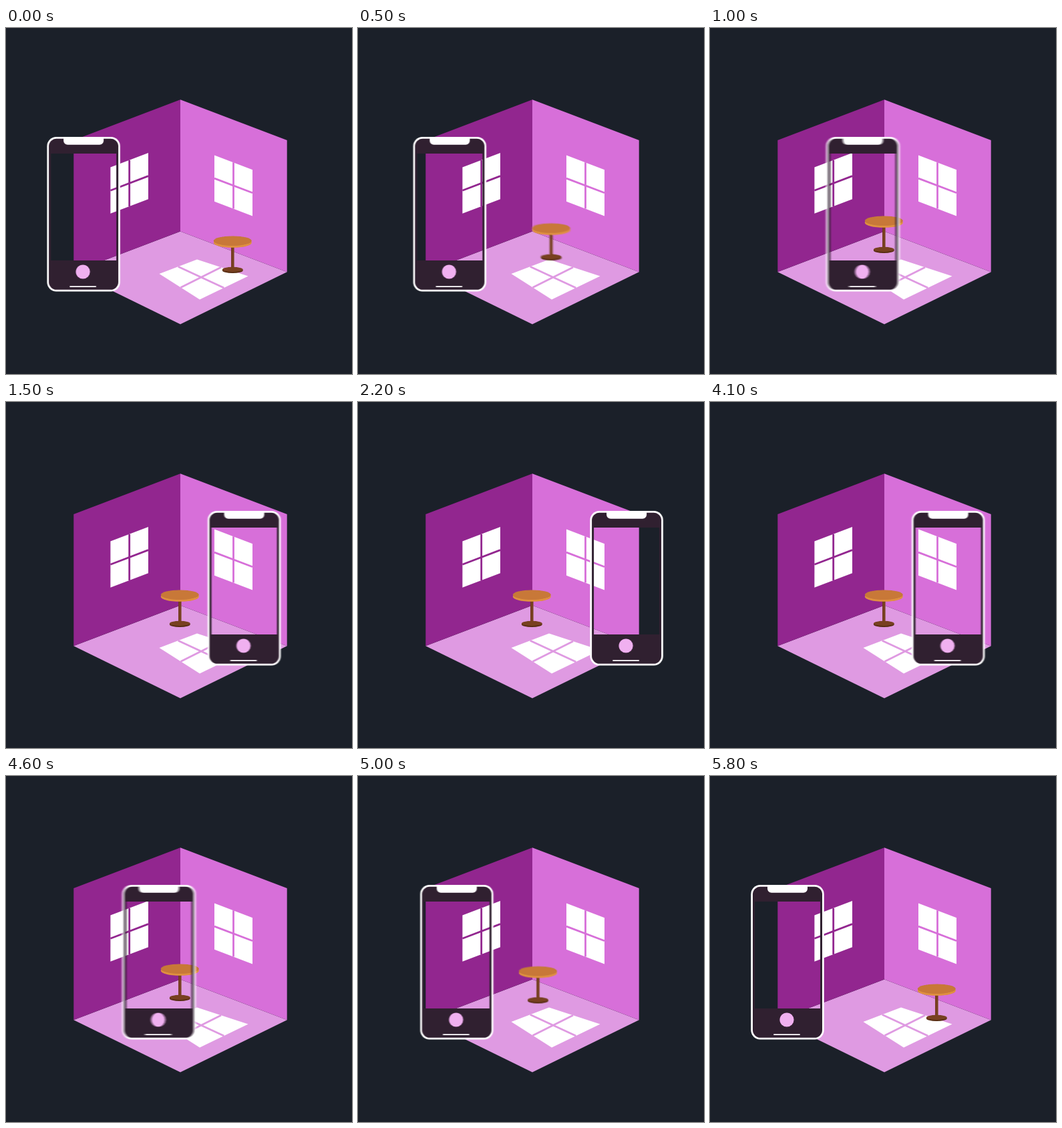
These frames come from a looping animation (518x518 px, 5900 ms). An HTML page with a canvas:

```html
<!DOCTYPE html>
<html lang="en">
<head>
<meta charset="utf-8">
<title>Room scan</title>
<style>
html, body { margin: 0; width: 100%; height: 100%; overflow: hidden; background: #1b2029; }
canvas { display: block; width: 518px; height: 518px; }
</style>
</head>
<body>
<canvas id="stage" width="518" height="518"></canvas>
<script>
const SIZE = 518, LOOP = 5900, STEP = 100;
const SHUTTER = 18, SAMPLES = 8;
const ROOM = { x: 261, y: 304.5, width: 159.7, height: 197.3, slope: 0.381 };
const COLOR = {
  back: '#1b2029', left: '#92268f', right: '#d76fd9', floor: '#df9ae2',
  body: '#2d1a2c', button: '#efacf0',
  top: '#c17635', rim: '#de8e3c', wood: '#713c1d', shade: '#54290f'
};
const ctx = document.getElementById('stage').getContext('2d');

function layer(draw) {
  const canvas = document.createElement('canvas');
  canvas.width = canvas.height = SIZE;
  draw(canvas.getContext('2d'));
  return canvas;
}

function poly(c, color, points) {
  c.fillStyle = color;
  c.beginPath();
  points.forEach(p => c.lineTo(...p));
  c.fill();
}

function ellipse(c, color, x, y, rx, ry = rx) {
  c.fillStyle = color;
  c.beginPath();
  c.ellipse(x, y, rx, ry, 0, 0, 7);
  c.fill();
}

// Box centred on x
function box(c, color, x, y, w, h, r = 0) {
  c.fillStyle = color;
  c.beginPath();
  c.roundRect(x - w / 2, y, w, h, r);
  c.fill();
}

// Rectangle on a wall; side is -1 (left) or 1 (right), heights are above the floor
function onWall(side, near, low, width, height) {
  const at = (d, h) => [ROOM.x + side * d, ROOM.y + ROOM.slope * d - h];
  const far = near + width, high = low + height;
  return [at(near, low), at(far, low), at(far, high), at(near, high)];
}

// White quad divided by two bars; cut is where one bar meets its edges
function panes(c, bar, quad, cut = 0.5) {
  const along = (i, k) => quad[i].map((a, axis) => a + (quad[(i + 1) % 4][axis] - a) * k);
  poly(c, '#fff', quad);
  c.strokeStyle = bar;
  c.lineWidth = 2.8;
  c.beginPath();
  [0.5, cut].forEach((k, i) => {
    c.moveTo(...along(i, k));
    c.lineTo(...along(i + 2, k));
  });
  c.stroke();
}

const room = layer(c => {
  const { x, y, width, height, slope } = ROOM;
  const edge = y + slope * width;
  c.fillStyle = COLOR.back;
  c.fillRect(0, 0, SIZE, SIZE);
  poly(c, COLOR.floor, [[x, y], [x + width, edge], [x, 443.5], [x - width, edge]]);
  poly(c, COLOR.left, onWall(-1, 0, 0, width, height));
  poly(c, COLOR.right, onWall(1, 0, 0, width, height));
  panes(c, COLOR.left, onWall(-1, 48, 66.5, 56.6, 69.3));
  panes(c, COLOR.right, onWall(1, 51, 64.2, 57, 69.3));
  panes(c, COLOR.floor, [[229.5, 368], [286, 346.5], [362.5, 371.5], [290, 406.5]], 0.47);
});

const table = layer(c => {
  const x = 339.3;
  ellipse(c, COLOR.shade, x, 363, 15.5, 4);
  ellipse(c, COLOR.wood, x, 361.5, 15.5, 3.7);
  box(c, COLOR.wood, x, 324, 4.5, 37);
  ellipse(c, COLOR.rim, x, 321.5, 28.5, 7.3);
  ellipse(c, COLOR.top, x, 318.7, 28.5, 7.3);
});

const phone = layer(c => {
  const x = 116, y = 163, w = 109.4, h = 231.5, border = 2.7;
  box(c, '#fff', x, y, w, h, 14);
  box(c, COLOR.body, x, y + border, w - 2 * border, h - 2 * border, 11.5);
  c.clearRect(x - 48.7, y + 25.2, 97.4, 159.3);
  box(c, '#fff', x, y + 1, 60, 10.8, [0, 0, 6, 6]);
  ellipse(c, COLOR.button, x - 1, y + 202, 10.6);
  box(c, '#fff', x - 1, y + 223.3, 40, 1.6, 0.8);
});

// Symmetric bezier ease with handles at (.6, 0) and (.4, 1)
function ease(t, start, duration) {
  const x = Math.min(1, Math.max(0, (t - start) / duration));
  let lo = 0, hi = 1;
  for (let i = 0; i < 24; i++) {
    const u = (lo + hi) / 2, v = 1 - u;
    if (1.8 * u * v * v + 1.2 * u * u * v + u * u * u < x) lo = u; else hi = u;
  }
  return lo * lo * (3 - 2 * lo);
}

// Out and back again
const trip = (t, out, back, duration) => ease(t, out, duration) - ease(t, back, duration);
const phoneShift = t => [286.3 * trip(t, -60, 3340, 2320), 0];
const tableShift = t => [-79, -30].map(d => d * trip(t, 0, 4740, 900));

// Averages several positions over the shutter time
function blurred(image, t, shift) {
  return layer(c => {
    c.globalCompositeOperation = 'lighter';
    c.globalAlpha = 1 / SAMPLES;
    for (let i = 0; i < SAMPLES; i++) {
      c.drawImage(image, ...shift(t + SHUTTER * ((i + 0.5) / SAMPLES - 0.5)));
    }
  });
}

let shown = -1;
function frame(now) {
  const t = Math.floor(now % LOOP / STEP) * STEP;
  if (t !== shown) {
    shown = t;
    ctx.drawImage(room, 0, 0);
    ctx.drawImage(blurred(table, t, tableShift), 0, 0);
    ctx.drawImage(blurred(phone, t, phoneShift), 0, 0);
  }
  requestAnimationFrame(frame);
}
frame(performance.now());
</script>
</body>
</html>
```
